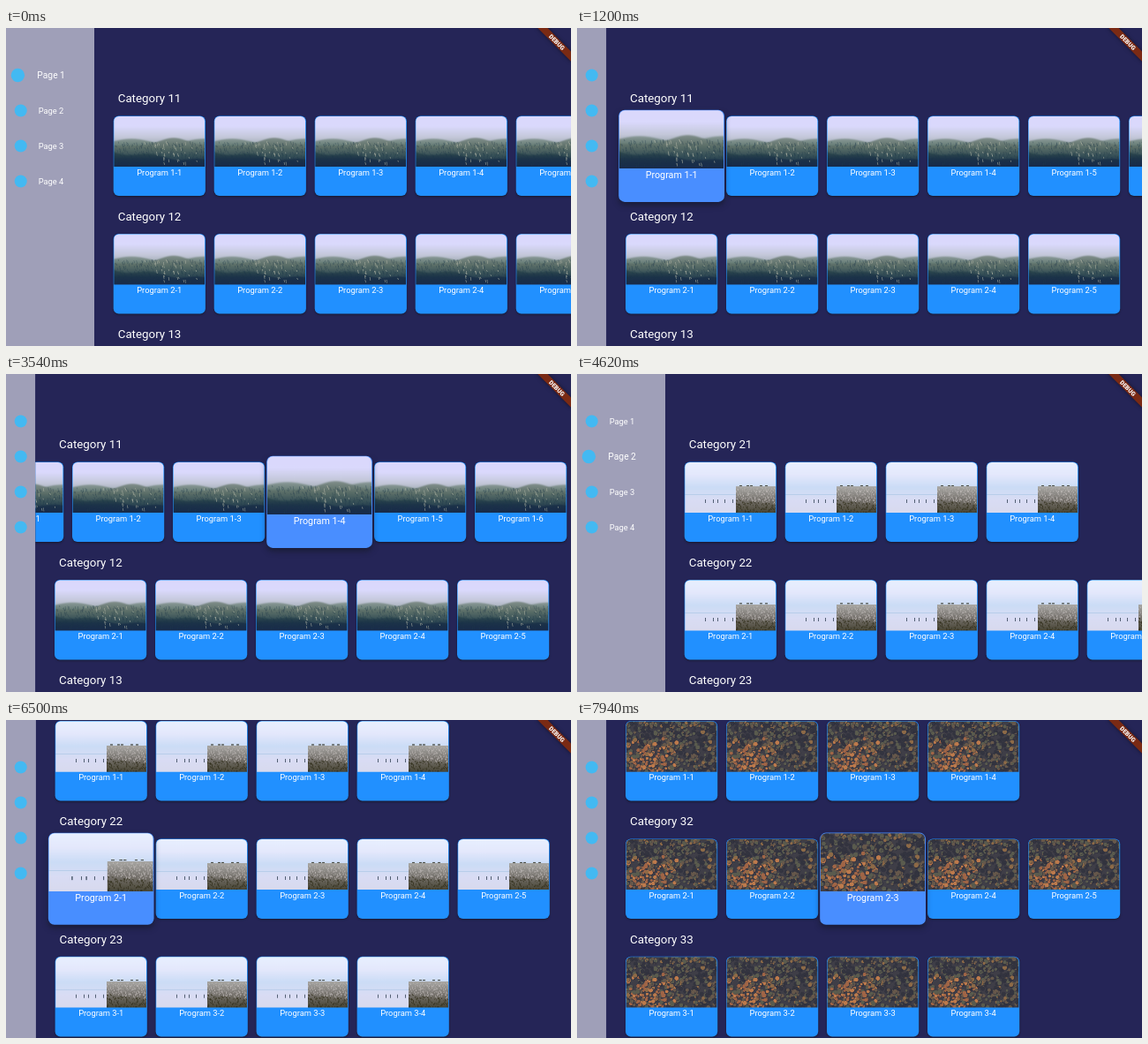
An HTML page with a canvas that plays this animation: 640 by 360 pixels, repeating every 8000 ms.

```html
<!DOCTYPE html>
<html lang="en">
<head>
<meta charset="utf-8">
<title>Program browser</title>
<style>
  html, body { margin: 0; width: 100%; height: 100%; overflow: hidden; background: #252557; }
  canvas { display: block; width: 640px; height: 360px; }
</style>
</head>
<body>
<canvas id="stage"></canvas>
<script>
const LOOP = 8000;
const W = 640, H = 360;
const CARD = { w: 104.2, h: 90.6, x: 55, y: 99.5, stepX: 114, stepY: 133.4, photoH: 57.7 };
const MENU = { closed: 33.3, open: 100 };

// Focus moves over time: "m2" is menu item 2, "1-3" is row 1, card 3.
const focusMoves = [
  [-1000, 'm1'], [800, '1-1'], [1320, '1-2'], [1560, '1-3'], [1800, '1-4'],
  [2040, '2-1'], [2480, '3-1'], [2720, '2-1'], [3140, '1-4'],
  [3720, '1-3'], [3800, '1-2'], [3880, '1-1'], [3940, 'm1'], [4340, 'm2'],
  [4940, '1-1'], [5280, '1-2'], [5620, '1-3'], [5940, '2-1'],
  [6500, 'm2'], [6960, 'm3'], [7500, '2-1'], [7640, '2-2'], [7780, '2-3']
];
const rowScrollByRow = { 1: 0, 2: 98.5, 3: 106 };
const pages = [
  { from: 0, loaded: 0, counts: [6, 5, 4] },
  { from: 4340, loaded: 4560, counts: [4, 5, 4] },
  { from: 6960, loaded: 7180, counts: [4, 5, 4] }
];

const easeOut = x => 1 - (1 - Math.min(1, Math.max(0, x))) ** 2;
const track = (t, keys, duration) =>
  keys.reduce((v, [start, target]) => v + (target - v) * easeOut((t - start) / duration), 0);

const inMenu = id => id[0] === 'm';
const menuKeys = focusMoves.map(([at, id]) => [at, inMenu(id) ? 1 : 0]);
const scrollKeys = focusMoves.filter(([, id]) => !inMenu(id))
  .map(([at, id]) => [at, rowScrollByRow[id[0]]]);
const firstRowKeys = [[1800, 94], [3720, 0]];
const focusAmount = (t, id) =>
  track(t, focusMoves.map(([at, key]) => [at, key === id ? 1 : 0]), 150);

function seeded(seed) {
  return () => (seed = (seed * 16807) % 2147483647) / 2147483647;
}

function makePhoto(paint) {
  const photo = document.createElement('canvas');
  photo.width = 312;
  photo.height = 174;
  const g = photo.getContext('2d');
  g.scale(3, 3);
  paint(g);
  return photo;
}

function gradient(g, y0, y1, ...colors) {
  const fill = g.createLinearGradient(0, y0, 0, y1);
  colors.forEach((c, i) => fill.addColorStop(i / (colors.length - 1), c));
  return fill;
}

// Fills everything below the curve y = height(x).
function hill(g, height, fill) {
  g.beginPath();
  g.moveTo(0, 58);
  for (let x = 0; x <= 104; x++) g.lineTo(x, height(x));
  g.lineTo(104, 58);
  g.fillStyle = fill;
  g.fill();
}

function paintMountains(g) {
  const rnd = seeded(41);
  g.fillStyle = gradient(g, 0, 36, '#dad8fd', '#dad9fc', '#c4c8da', '#98a4aa');
  g.fillRect(0, 0, 104, 58);
  g.filter = 'blur(2px)';
  hill(g, x => 29 - 3 * Math.sin(x / 13), gradient(g, 24, 58, '#93a0a0', '#60776f', '#2c4653', '#1c3150'));
  hill(g, x => 34 - 9 * Math.exp(-(((x - 68) / 22) ** 2)),
    gradient(g, 24, 58, '#84918e', '#5d7069', '#324c55', '#1b2e4c'));
  hill(g, x => 41 + 0.1 * x + 2 * Math.sin(x / 9), gradient(g, 40, 58, '#34504f', '#1c3349', '#172a4a'));
  g.filter = 'none';
  // Bare rock runs down the cliff to the right, trees darken the rest.
  for (let i = 0; i < 260; i++) {
    const x = rnd() * 104, depth = rnd(), y = 29 + depth * 25;
    const rock = Math.exp(-(((x - 58 - depth * 16) / 17) ** 2));
    g.strokeStyle = rnd() < rock * 0.6 ? '#aeb3a488' : '#1f3a4a44';
    g.lineWidth = 1;
    g.beginPath();
    g.moveTo(x, y);
    g.lineTo(x + 0.8, y + 1.5 + rnd() * 3);
    g.stroke();
  }
}

function paintBeach(g) {
  const rnd = seeded(77);
  g.fillStyle = gradient(g, 0, 58, '#e8f0ff', '#e4e8fc', '#cbdcf6', '#d9dcf4', '#d8daee');
  g.fillRect(0, 0, 104, 58);
  g.fillStyle = '#b8cdea';
  g.fillRect(0, 37, 60, 1);
  g.fillStyle = '#536074';
  [23, 32, 37, 45, 54].forEach(x => g.fillRect(x, 43, 1.1, 4));
  g.fillStyle = gradient(g, 28, 58, '#a9a8a5', '#77736e', '#484535');
  g.fillRect(58, 28, 46, 30);
  for (let i = 0; i < 360; i++) {
    const x = 58 + rnd() * 45, y = 29 + rnd() * 28;
    g.fillStyle = y > 42 + (x - 58) * 0.12 ? '#35321fb0' : '#c3bebc88';
    g.fillRect(x, y, 0.8, 1.5);
  }
  g.fillStyle = '#4c5049';
  [62, 70, 74, 85, 91].forEach(x => g.fillRect(x, 26.5, 3, 1.2));
}

function paintForest(g) {
  const rnd = seeded(19);
  g.fillStyle = '#3f3e47';
  g.fillRect(0, 0, 104, 58);
  for (let i = 0; i < 620; i++) {
    const x = rnd() * 104, y = rnd() * 58, r = 1 + rnd() * 1.5;
    const warm = Math.exp(-(((x - 27) / 25) ** 2) - ((y - 42) / 15) ** 2);
    const pick = rnd();
    const crown = pick < warm * 0.75 ? (rnd() < 0.5 ? '#bd7a4c' : '#a06546')
      : pick < 0.4 ? '#33343f' : pick < 0.68 ? '#5a5b4e' : pick < 0.9 ? '#66584b' : '#8d6a47';
    g.fillStyle = '#2c2d3c90';
    g.beginPath();
    g.arc(x + 0.6, y + 0.7, r, 0, 7);
    g.fill();
    g.fillStyle = crown;
    g.beginPath();
    g.arc(x, y, r, 0, 7);
    g.fill();
  }
}

const photos = [paintMountains, paintBeach, paintForest].map(makePhoto);

const stage = document.getElementById('stage');
const ctx = stage.getContext('2d');
const density = window.devicePixelRatio || 1;
stage.width = W * density;
stage.height = H * density;

function label(text, x, y, size, align = 'left', weight = 400) {
  ctx.font = `${weight} ${size}px Roboto, sans-serif`;
  ctx.textAlign = align;
  ctx.textBaseline = 'alphabetic';
  ctx.fillStyle = '#fff';
  ctx.fillText(text, x, y + size * 0.355);
}

function mixFocus(a) {
  return `rgb(${33 + 40 * a}, ${144 - 2 * a}, 255)`;
}

function drawCard(x, y, name, photo, focus) {
  const { w, h, photoH } = CARD;
  const scale = 1 + 0.15 * focus;
  ctx.save();
  ctx.translate(x + w / 2, y + h / 2);
  ctx.scale(scale, scale);
  ctx.translate(-w / 2, -h / 2);

  ctx.save();
  ctx.shadowColor = 'rgba(18, 24, 34, .6)';
  ctx.shadowBlur = (2 + 4 * focus) * density;
  ctx.shadowOffsetY = (1.3 + 2.2 * focus) * density;
  ctx.fillStyle = mixFocus(focus);
  ctx.beginPath();
  ctx.roundRect(0, 0, w, h, 6);
  ctx.fill();
  ctx.restore();

  if (photo) {
    ctx.save();
    ctx.beginPath();
    ctx.roundRect(0.6, 0.5, w - 1.4, photoH - 0.5, [5.5, 5.5, 0, 0]);
    ctx.clip();
    ctx.drawImage(photo, 0, 0, w, photoH);
    ctx.restore();
  }
  label(name, w / 2, 64, 9.33, 'center');
  ctx.restore();
}

function drawContent(t, menuWidth) {
  const pageIndex = pages.findLastIndex(p => t >= p.from);
  const page = pages[pageIndex];
  const photo = t >= page.loaded ? photos[pageIndex] : null;
  const shift = menuWidth - MENU.closed;
  const scrollY = track(t, scrollKeys, 225);
  const firstRowX = pageIndex === 0 ? track(t, firstRowKeys, 225) : 0;

  ctx.save();
  ctx.beginPath();
  ctx.rect(menuWidth, 0, W, H);
  ctx.clip();
  page.counts.forEach((count, r) => {
    const top = CARD.y + r * CARD.stepY - scrollY;
    label(`Category ${pageIndex + 1}${r + 1}`, 60 + shift, top - 20, 13.33);
    const cards = Array.from({ length: count }, (_, c) => {
      const id = `${r + 1}-${c + 1}`;
      return { id, c, focus: focusAmount(t, id) };
    }).sort((a, b) => a.focus - b.focus);
    for (const { id, c, focus } of cards) {
      const x = CARD.x + c * CARD.stepX + shift - (r === 0 ? firstRowX : 0);
      drawCard(x, top, `Program ${id}`, photo, focus);
    }
  });
  ctx.restore();
}

function drawMenu(t, width) {
  ctx.save();
  ctx.beginPath();
  ctx.rect(0, 0, width, H);
  ctx.clip();
  ctx.fillStyle = '#9f9fb8';
  ctx.fillRect(0, 0, width, H);
  for (let i = 1; i <= 4; i++) {
    const scale = 1 + 0.1 * focusAmount(t, 'm' + i);
    ctx.save();
    ctx.translate(50, 13.5 + i * 40);
    ctx.scale(scale, scale);
    ctx.fillStyle = '#43b9f2';
    ctx.beginPath();
    ctx.arc(-33.3, 0, 7, 0, 7);
    ctx.fill();
    label('Page ' + i, -13.3, 0.3, 9.33);
    ctx.restore();
  }
  ctx.restore();
}

function drawBanner() {
  ctx.save();
  ctx.translate(W, 0);
  ctx.rotate(Math.PI / 4);
  ctx.shadowColor = 'rgba(0, 0, 0, .5)';
  ctx.shadowBlur = 4 * density;
  ctx.fillStyle = '#7a2a14';
  ctx.fillRect(-27, 18.7, 54, 8);
  ctx.shadowColor = 'transparent';
  label('DEBUG', 0, 22.7, 6.8, 'center', 900);
  ctx.restore();
}

function draw(now) {
  const t = now % LOOP;
  const menuWidth = MENU.closed + (MENU.open - MENU.closed) * track(t, menuKeys, 220);
  ctx.setTransform(density, 0, 0, density, 0, 0);
  ctx.fillStyle = '#252557';
  ctx.fillRect(0, 0, W, H);
  drawContent(t, menuWidth);
  drawMenu(t, menuWidth);
  drawBanner();
}

const began = performance.now();
function tick() {
  draw(performance.now() - began);
  requestAnimationFrame(tick);
}
tick();
</script>
</body>
</html>
```
